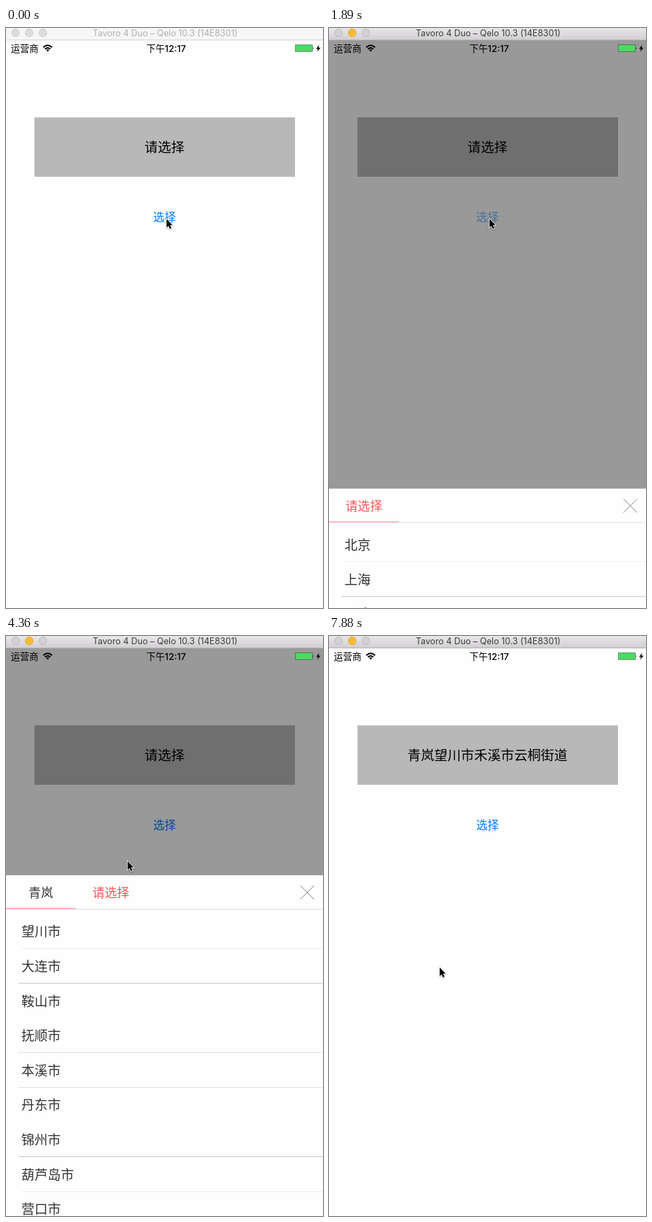
Write an HTML page that moves like this. It is 464 px wide and 846 px high and loops after 8000 ms.

```html
<!DOCTYPE html>
<html lang="zh-CN">
<head>
<meta charset="utf-8">
<title>地区选择</title>
<style>
  html, body { margin: 0; width: 100%; height: 100%; overflow: hidden; background: #fefefe; }
  svg { display: block; width: 100vw; height: 100vh; }
  text { font-family: "Noto Sans CJK SC", "Noto Sans CJK", sans-serif; }
  .latin { font-family: Inter, Roboto, sans-serif; }
  .mid { text-anchor: middle; }
</style>
</head>
<body>
<svg viewBox="0 0 464 846" preserveAspectRatio="none">
  <defs>
    <linearGradient id="barFill" x2="0" y2="1">
      <stop stop-color="#e9e7e9"/><stop offset="1" stop-color="#d1cfd1"/>
    </linearGradient>
  </defs>
  <rect width="464" height="846" fill="#fefefe"/>

  <rect x="41.6" y="130.4" width="381.4" height="86.6" fill="#b8b8b8"/>
  <text id="result" class="mid" x="232" y="181.2" font-size="19.5"></text>
  <text id="pick" class="mid" x="232" y="282" font-size="16.6" fill="#007aff">选择</text>
  <rect id="dim" y="17" width="464" height="829" fill-opacity=".4"/>

  <g id="status">
    <text x="7" y="34.6" font-size="13.5">运营商</text>
    <g fill="none" stroke="#000" stroke-width="2">
      <path d="M54.6 28.2 Q61 22.2 67.4 28.2"/>
      <path d="M57 30.8 Q61 27.2 65 30.8"/>
    </g>
    <path d="M58.6 32.1 Q61 30.2 63.4 32.1 L61 34.6Z"/>
    <text class="mid" x="234.5" y="34.6" font-size="13.4" font-weight="500">下午<tspan class="latin">12:17</tspan></text>
    <rect x="423.5" y="24.5" width="25" height="10" fill="#4cd964" stroke="#000" stroke-opacity=".35"/>
    <path d="M449.3 28 q1.6 1.5 0 3.2z"/>
    <path d="M458.4 24.6 L453.8 30.6 H456.6 L455.4 34.8 L460.4 28.7 H457.4Z"/>
  </g>

  <g id="sheet">
    <rect y="349" width="464" height="520" fill="#fefefe"/>
    <path d="M0 398.5H464" stroke="#dedede"/>
    <path d="M431 364 L451 384 M451 364 L431 384" stroke="#858585"/>
    <g id="tabs"></g>
    <rect id="mark" y="397" width="102" height="1" fill="#fa9092"/>
    <g id="rules"></g>
    <g id="rows"></g>
  </g>

  <rect id="bar" width="464" height="17"/>
  <rect id="barEdge" y="17" width="464" height="1"/>
  <g id="lights"></g>
  <text id="title" class="latin mid" x="233" y="12" font-size="12.7">Tavoro 4 Duo – Qelo 10.3 (14E8301)</text>

  <path id="cursor" d="M1 1.5 V14 L3.8 11.4 L5.8 16 L8 15 L6 10.6 H9.8Z"
        stroke="#fff" stroke-width="1.6" paint-order="stroke"
        style="filter:drop-shadow(0 1px 1px rgba(0,0,0,.3))"/>
</svg>
<script>
const LOOP = 8000;
const TICK = 88.5;
const ASK = '请选择';
const TAB_STEP = 102.5, ROW_STEP = 50.6;
const PICKED = ['青岚', '望川市', '禾溪市', '云桐街道'];
const LISTS = [
  '北京 上海 天津 重庆 河北 山西 河南 青岚 吉林',
  '望川市 大连市 鞍山市 抚顺市 本溪市 丹东市 锦州市 葫芦岛市 营口市',
  '苏家屯区 禾溪市 法库县 辽中县 康平县 皇姑区 铁西区 大东区 沈河区',
  '松门街道 云桐街道 柳坞街道 南禾街道 晴岭街道 白榆镇 梧溪镇 石桐镇 霁河乡'
].map(s => s.split(' '));

// All times below are in ticks.
const ACTIVATE = 17, OPEN = 19, CLOSE = 87, CLOSED = 89;
const SWAPS = [47, 67, 81];
const SLIDES = [59.36, 69.4, 81.3];
const SLIDE_TIME = 3.4;

const HOME = { x: 234, y: 277 };
const GLIDES = [
  { at: 22.2, time: 5, x: 230, y: 228 },
  { at: 27, time: 10, x: 128, y: 429 },
  { at: 39.95, time: 3, x: 177, y: 627 },
  { at: 43, time: 3, x: 178, y: 782 },
  { at: 47, time: 2, x: 177, y: 327 },
  { at: 50, time: 7, x: 159, y: 505 },
  { at: 60, time: 3, x: 157, y: 434 },
  { at: 67, time: 4, x: 138, y: 478 },
  { at: 72, time: 3, x: 145, y: 485 },
  { at: 81, time: 4, x: 161, y: 482 }
];

const $ = id => document.getElementById(id);

function add(parent, tag, attrs) {
  const el = document.createElementNS('http://www.w3.org/2000/svg', tag);
  for (const key in attrs) el.setAttribute(key, attrs[key]);
  return $(parent).appendChild(el);
}

const clamp = v => Math.min(1, Math.max(0, v));
const ramp = (t, start, length) => clamp((t - start) / length);
const ease = p => p < .5 ? 2 * p * p : 1 - 2 * (1 - p) * (1 - p);

const lights = [0, 1, 2].map(i => add('lights', 'circle', { cx: 14 + i * 20, cy: 7, r: 5.6 }));
const tabs = PICKED.map((_, i) =>
  add('tabs', 'text', { class: 'mid', x: 51 + i * TAB_STEP, y: 380.7, 'font-size': 18 }));
const rows = LISTS[0].map((_, i) =>
  add('rows', 'text', { x: 22.6, y: 438.3 + i * ROW_STEP, 'font-size': 19.2, fill: '#333' }));

// Hairlines fade in and out of the pixel grid, mirrored about the middle row.
const SHADES = ['#dfdfdf', 'none', '#c8c8c8', '#ebebeb'];
for (let i = 0; i < 8; i++) {
  const phase = Math.floor(Math.abs(i - 3.5));
  const x = phase === 3 ? 23 : 18;
  add('rules', 'rect', {
    x, y: Math.round(455.4 + i * ROW_STEP), width: 464 - x, height: 1, fill: SHADES[phase]
  });
}

function cursorAt(t) {
  let { x, y } = HOME;
  for (const g of GLIDES) {
    const p = ease(ramp(t, g.at, g.time));
    x += (g.x - x) * p;
    y += (g.y - y) * p;
  }
  return [Math.round(x), Math.round(y)];
}

function drawBar(active) {
  $('bar').setAttribute('fill', active ? 'url(#barFill)' : '#f6f6f6');
  $('barEdge').setAttribute('fill', active ? '#b4b2b4' : '#d2d2d2');
  $('title').setAttribute('fill', active ? '#3c3c3c' : '#b0b0b0');
  lights.forEach((light, i) => {
    const lit = active && i === 1;
    light.setAttribute('fill', lit ? '#fdbd2f' : active ? '#d3d1d3' : '#dcdcdc');
    light.setAttribute('stroke', lit ? '#e0a32a' : active ? '#bbb9bb' : '#cfcfcf');
  });
}

function drawSheet(t) {
  const level = SWAPS.filter(s => t >= s).length;
  tabs.forEach((tab, i) => {
    tab.textContent = i < level ? PICKED[i] : i === level ? ASK : '';
    tab.setAttribute('fill', i === level ? '#fa5558' : '#333');
  });
  rows.forEach((row, i) => { row.textContent = LISTS[level][i]; });
  const shift = SLIDES.reduce((sum, s) => sum + ease(ramp(t, s, SLIDE_TIME)), 0);
  $('mark').setAttribute('x', shift * TAB_STEP);
  const hidden = 1 - ease(ramp(t, OPEN + .2, 4.3)) + ease(ramp(t, CLOSE - .6, 2.6));
  $('sheet').setAttribute('transform', `translate(0 ${hidden * 497})`);
}

function draw(ms) {
  const t = Math.floor(ms / TICK);
  drawBar(t >= ACTIVATE);
  drawSheet(t);
  $('result').textContent = t >= CLOSE ? PICKED.join('') : ASK;
  $('pick').setAttribute('opacity', t < ACTIVATE ? 1 : .2 + .8 * ramp(t, OPEN, 5));
  $('dim').setAttribute('visibility', t >= OPEN && t < CLOSED ? 'visible' : 'hidden');
  $('cursor').setAttribute('transform', `translate(${cursorAt(t)})`);
}

const start = performance.now();
function loop() {
  draw((performance.now() - start) % LOOP);
  requestAnimationFrame(loop);
}
loop();
</script>
</body>
</html>
```
